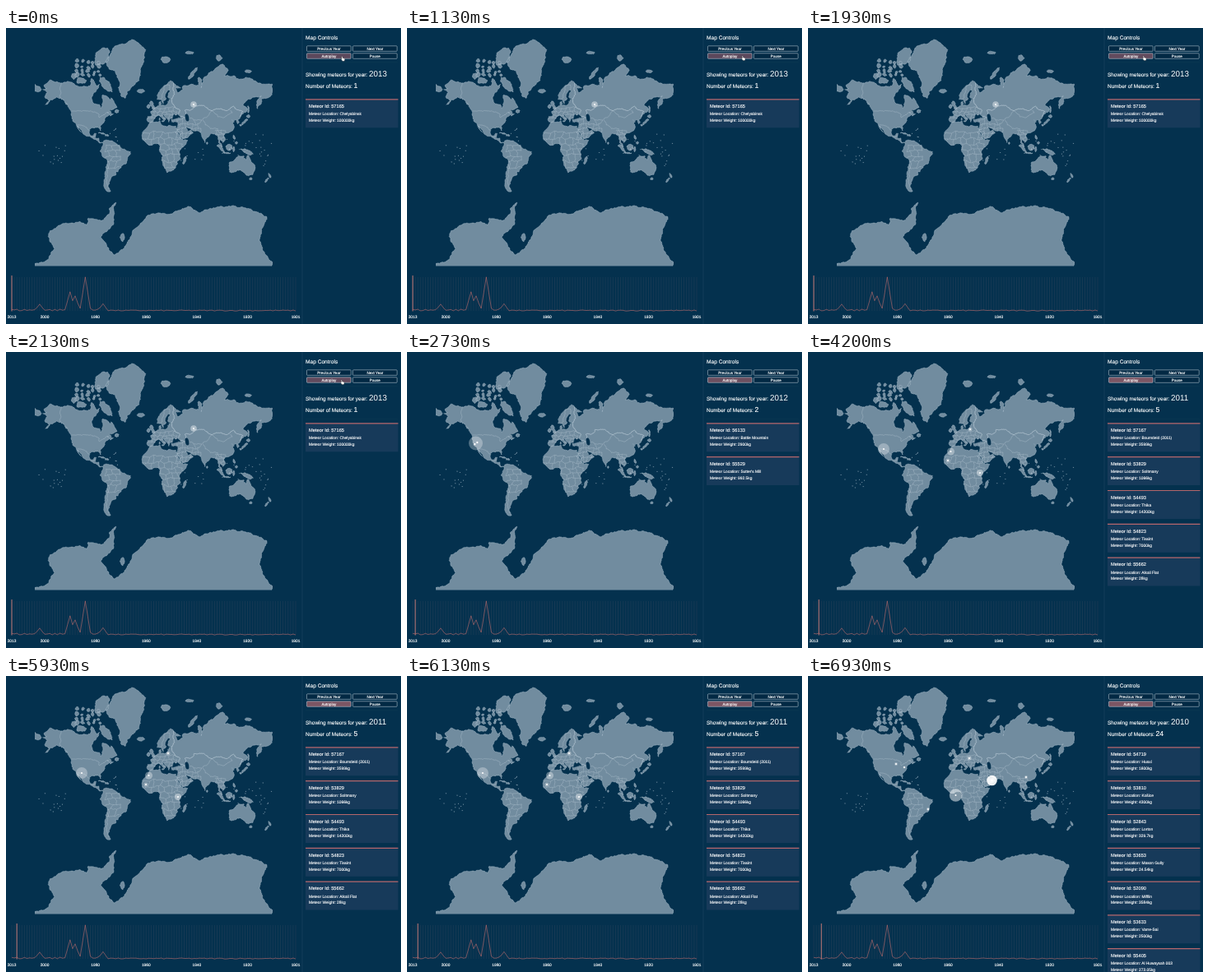
An HTML page for the animation above (8 s loop, 480x360 px).

```html
<!DOCTYPE html>
<html lang="en">
<head>
<meta charset="utf-8">
<title>Meteor map</title>
<style>
html, body { margin: 0; width: 100%; height: 100%; overflow: hidden; background: #04314e; }
svg { display: block; width: 100%; height: 100%; }
text { font-family: "Liberation Sans", Arial, sans-serif; fill: #fff; stroke: #fff; stroke-width: .13; text-rendering: geometricPrecision; }
.big { stroke: none; }
.mid { text-anchor: middle; }
#land { fill: #718c9f; stroke: #b0c3d0; stroke-width: .45; stroke-linejoin: round; }
#borders { fill: none; stroke: #b0c3d0; stroke-width: .4; }
</style>
</head>
<body>
<svg viewBox="0 0 480 360">
  <clipPath id="frame"><path d="M35 10H324V289.500H35Z"/></clipPath>
  <clipPath id="coast"><path id="coastline"/></clipPath>
  <g clip-path="url(#frame)">
    <path id="land"/>
    <path id="borders" clip-path="url(#coast)"/>
    <ellipse cx="220" cy="109" rx="2.200" ry="4.500" fill="#04314e" transform="rotate(-12 220 109)"/>
  </g>
  <g id="meteors"></g>
  <g id="chart"></g>
  <path d="M360 0V360" stroke="#1b4260" stroke-width=".7"/>
  <path d="M364 41.500H476M364 81.500H476" stroke="#0d3853" stroke-width=".5"/>
  <text x="364" y="14" font-size="6.600">Map Controls</text>
  <g id="buttons"></g>
  <g id="panel"></g>
  <path id="cursor" d="M0 0q.9-.6 1.100.500l.3 1.500 2 .5q.7.300.500 1.200l-.5 2h-2.400l-1.500-2.200q-.2-.9.700-.5Z" fill="#fff" stroke="#222" stroke-width=".35"/>
</svg>
<script>
const $ = id => document.getElementById(id);
const add = (id, markup) => $(id).insertAdjacentHTML('beforeend', markup);
let seed = 7;
const random = (a, b) => a + (b - a) * ((seed = seed * 16807 % 2147483647) / 2147483647);

// Mercator map
const project = ([lon, lat]) => [179.5 + lon * .803, 146 - 46 * Math.log(Math.tan(Math.PI / 4 + lat * Math.PI / 360))];
const parse = s => s.split(', ').map(p => project(p.split(' ').map(Number)));
// Jagged edge; gives the same line in both directions, so neighbours fit
const rough = (p, q) => {
  const len = Math.hypot(q[0] - p[0], q[1] - p[1]);
  if (len < 1.5) return [q];
  const w = Math.min(len * .15, .8), sx = p[0] + q[0], sy = p[1] + q[1];
  const m = [sx / 2 + w * Math.sin((sx + sy) * 7.3), sy / 2 + w * Math.cos((sx + sy) * 5.1)];
  return [...rough(p, m), ...rough(m, q)];
};
const trace = pts => 'M' + pts.flatMap((p, i) => i ? rough(pts[i - 1], p) : [p])
  .map(p => p.map(v => v.toFixed(2)).join(' ')).join('L');
let coast = '', lines = '';
const shape = pts => coast += trace([...pts, pts[0]]) + 'Z';
const land = s => shape(parse(s));
const border = s => lines += trace(parse(s));
const blob = (lon, lat, rx, ry, tilt = 0) => {
  const [x, y] = project([lon, lat]), c = Math.cos(tilt * Math.PI / 180), s = Math.sin(tilt * Math.PI / 180);
  shape(Array.from({ length: 8 }, (_, i) => {
    const a = i * Math.PI / 4, k = random(.75, 1.2), u = rx * k * Math.cos(a), v = ry * k * Math.sin(a);
    return [x + u * c - v * s, y + u * s + v * c];
  }));
};

// North America
land('-168 66, -162 66.5, -166 68.4, -156.5 71.3, -141 69.6, -128 70.3, -115 68, -96 68.2, -94 72, -86 68, -82 69, -87 65, -94 61, -92.5 57, -82.3 55, -80 51.2, -76.6 57, -77.5 62.4, -70 61, -66 58.8, -64.5 60.3, -56 52, -66 50.2, -70 47, -65 49, -64.5 46.3, -61 45.8, -65.5 43.5, -67 45, -74 40.6, -76 35.5, -81 31.5, -80.4 25.3, -84 30, -94 29.5, -97.3 27.5, -97.7 22.5, -95 18.3, -91 18.5, -90.3 21, -87 21.4, -88.8 15.8, -83.2 15, -82 9, -77.3 8.5, -83 8.3, -87.6 13, -95 16, -105.5 20, -109.3 26, -114.7 31.7, -109.5 23.2, -117 32.5, -122.4 37.5, -124.4 47, -130 54, -137 58.9, -147 60.8, -152 59.2, -164 54.7, -158 58.5, -165 61, -161 64');
border('-141 70, -141 60.3, -137 58.9, -130 55.3');
border('-124 49, -112 49, -104 49, -95 49, -89 48, -82.5 45.3, -82.5 42, -75 45, -69 47.4, -67 45');
border('-117 32.5, -106.5 31.8, -101.5 29.8, -97 26');
border('-92 14, -91 17.5, -88 18');
land('-73 78.3, -60 82, -32 83.5, -12 81.5, -20 75, -22 71, -32 68, -40 65, -43 60, -50 62, -53.5 67, -51 69.5, -58 75, -68 76');

// South America
land('-77.3 8.5, -71.7 12.4, -62 10.6, -51.5 4.2, -50 0, -35.2 -5.3, -39 -13, -41 -22, -48.6 -26, -54 -34, -58.3 -34, -57 -37.5, -62.2 -39, -65 -42, -67.4 -46, -69 -50.5, -65.2 -54.7, -71 -54.5, -75.5 -50, -73.6 -38, -70.3 -18.3, -76 -14, -81.3 -5, -77.5 3');
border('-68.4 -52.4, -71.5 -45, -70 -33, -67 -22.8, -70.4 -18.3');

// Europe and Asia meet along the borders of Russia
land('-9 37, -8.8 43.2, -1.8 43.4, -4.6 48.4, 4.5 52.5, 8.5 54, 8.2 57, 10.5 57.6, 10.5 54.3, 19 54.5, 21.5 57.6, 24 57.2, 23.5 59, 28 60, 28 56, 32 53, 40 49.6, 39 47.2, 33.5 44.5, 30.5 46.2, 28 42, 28.5 41.2, 23.8 40.2, 22.8 36.5, 19.4 41.5, 12.8 45.5, 18.4 40, 15.8 38, 12.3 41.7, 8.5 44.3, 3.2 43, -.3 39.5, -2 36.8, -5.5 36.1');
land('28 60, 22.8 60, 21.3 61.5, 25 65, 22 65.7, 17.3 62, 18.8 59.8, 14.3 55.5, 11 59, 5.3 59, 5 62, 14 67.5, 25.5 71, 30 69.7, 29 67, 31.5 62.8');
border('11 59, 12.3 62, 16.5 68, 24 68.5, 24 65.8');
land('30 69.7, 41 67, 33 66.7, 37 64, 44 66.2, 44 68, 60 69, 68 68.4, 68 72.5, 73 71, 72 67, 76 72.5, 87 75, 104 77.6, 113 75.5, 107 73.2, 123 73, 129 71.5, 140 72.5, 160 69.7, 180 69, 180 65, 179 62.5, 170 60, 163 59, 162 55, 157 51, 156 57, 163 61.5, 143 59.3, 135 54.7, 141 52, 140 48, 131 42.6, 135 48.4, 127 50, 121 53.3, 110 49.2, 98 51, 87 49.2, 76 54, 61 54, 59 50.7, 47 49.5, 48.5 41.8, 40 43.4, 37 45, 40 49.6, 32 53, 28 56, 28 60, 31.5 62.8, 29 67');
land('-180 69, -170 66, -174 64.5, -180 65');
land('48.5 41.8, 47 49.5, 59 50.7, 61 54, 76 54, 87 49.2, 98 51, 110 49.2, 121 53.3, 127 50, 135 48.4, 131 42.6, 127.5 39.5, 129.3 36, 126.5 34.5, 125 39.5, 118 39, 122 37, 119.5 35, 121.8 31, 119.5 25.5, 114 22.5, 108 21.5, 106 19, 109 13, 105 9, 101 13, 99.5 10, 104 1.5, 98.3 8, 97.3 16.7, 92 21, 87 21.5, 80 15, 77.5 8, 73 17, 72 21, 66.5 25.2, 57 26.5, 48 30, 51.5 24.5, 56.3 26, 59.7 22.5, 52 16, 43.5 12.8, 39 21.5, 35 29.5, 36 36.5, 27.5 36.8, 26.5 40, 41 41.5, 40 43.4');
border('87 49.2, 97 42.7, 105 41.6, 119 47, 116 49.5');
border('87 49.2, 80 42, 74 39.5, 78 33, 86 28, 97 28, 99 22, 108 21.5');

// Africa and Australia
land('-6 35.8, 10 37.3, 11 34, 20 30.8, 23 32.6, 34.3 31.2, 32.6 29.9, 37.3 21, 43.2 11.7, 51.2 11.8, 39 -4, 40.6 -15, 35 -20, 35.5 -24, 30.5 -31, 20 -34.8, 11.8 -18, 13.7 -11, 9 -1, 9.7 4, 4 6.4, -7.6 4.4, -16.7 12.5, -17 21.2, -9.8 30');
land('114 -22, 122 -18, 130 -12, 136.8 -12.2, 135.5 -15, 140 -17.7, 142.3 -10.8, 153.2 -25.5, 153 -31, 150 -37.3, 143.5 -38.7, 138 -35.5, 131.2 -31.5, 118 -35, 115 -34.2');

// Antarctica
land('-180 -84.6, -160 -84, -150 -82, -160 -79, -157 -77.2, -146 -75.7, -135 -74.5, -115 -74, -101 -75, -100 -72.5, -80 -73.3, -67 -70, -67 -67, -57 -63.3, -61 -67, -61 -75, -80 -79, -68 -82, -60 -83.2, -45 -82, -35 -79, -28 -76.5, -10 -71, 0 -70, 25 -70.2, 33 -68.7, 54 -66, 70 -69.5, 80 -67.8, 100 -66, 135 -66.2, 150 -68.5, 171 -71.5, 163 -77, 160 -80, 168 -83, 180 -84.4, 180 -86, -180 -86');

// Islands: longitude, latitude, radii, tilt
[[-2.5, 54.3, 2, 6, -18], [-8, 53.3, 1.8, 2.6], [-19, 65, 4.3, 2.4], [18, 79, 5, 4], [58, 73.8, 2.3, 9, 38],
 [54, 80.8, 5, 1.8], [99, 79.4, 3.5, 4], [143, 75, 4.500, 1.800], [-73, 69, 4.5, 11, -40], [-78, 80, 8, 13, 35],
 [-110, 71, 6, 4], [-121, 73, 3, 4], [-56, 48.8, 2.3, 2.3], [-47, -79.3, 3, 5]].forEach(b => blob(...b));
[[-79, 21.7, 4.5, .7, 15], [-71, 18.9, 2.2, 1], [46.7, -19, 1.7, 5.3, 20], [101.5, -.5, 7, 1.6, 48], [110, -7.3, 4, .7, 8],
 [114, .8, 3.8, 4.4, 20], [121, -2, 1.2, 3], [141, -5.2, 8, 2.3, 22], [121.5, 16, 1.2, 2.8, -15], [125, 8, 1.6, 1.6],
 [137.5, 36.5, 6, 1.2, -45], [143, 43.4, 2, 1.7], [131, 32.8, 1, 1.3], [142.8, 50.5, .9, 5], [80.8, 7.5, .8, 1.5],
 [146.7, -42, 1.6, 1.5], [175.8, -38.7, 1.2, 3, -25], [170.8, -43.7, 1.3, 4.2, 38], [14, 37.6, 1.2, .7], [9, 40, .6, 1.5]].forEach(b => blob(...b));
// Arctic archipelago and scattered specks
for (let lat = 73.3; lat < 80; lat += 1.7)
  for (let lon = -117; lon < -82; lon += 8.5)
    blob(lon + random(-2, 2), lat + random(-.4, .4), random(1.5, 3), random(1.2, 2.8), random(0, 90));
const specks = (n, x0, y0, x1, y1) => {
  while (n--) coast += `M${random(x0, x1)} ${random(y0, y1)}h.7l-.3.5Z`;
};
specks(16, 36, 142, 72, 166);
specks(20, 288, 128, 323, 168);
specks(12, 262, 132, 284, 156);
specks(8, 212, 146, 240, 164);
specks(8, 122, 122, 136, 137);

// Small countries: a wall of uneven bricks, cut at the coast
const bricks = (lon0, lat0, lon1, lat1, w, h) => {
  const row = lat => Array.from({ length: Math.round((lon1 - lon0) / w * 2) + 1 }, (_, i) =>
    project([lon0 + i * w / 2 + random(-.2, .2) * w, lat + random(-.25, .25) * h]));
  let last;
  for (let lat = lat0, k = 0; lat <= lat1; lat += h, k++) {
    const pts = row(lat);
    lines += trace(pts);
    if (last) pts.forEach((p, i) => { if (i % 2 == k % 2) lines += trace([last[i], p]); });
    last = pts;
  }
};
bricks(-18, -28, 42, 30, 10, 8.5);
bricks(-8, 41, 34, 54, 7, 3.6);
bricks(35, 16, 72, 44, 9, 6);
bricks(92, 10, 108, 25, 7, 5);
bricks(-74, -28, -50, 6, 11, 8);

$('land').setAttribute('d', coast);
$('coastline').setAttribute('d', coast);
$('borders').setAttribute('d', lines);

// Timeline: a low ripple with a few sharp peaks, given as index and height
const yearX = i => 7 + i * 345 / 112;
const peaks = [[11, 9], [23, 24], [25, 19], [29, 42], [36, 9.5]];
const count = i => Math.max(random(.6, i < 40 ? 3 : 1.8), ...peaks.map(([at, h]) => h * (1 - Math.abs(i - at) / 2.2)));
const years = Array.from({ length: 113 }, (_, i) => i);
add('chart', `<path d="${years.map(i => `M${yearX(i)} 303V344`).join('')}" stroke="#29435b" stroke-width=".5"/>
  <path id="now" stroke="#d9827c" stroke-width=".9"/>
  <path d="M${years.map(i => `${yearX(i)} ${344.8 - count(i)}`).join('L')}" fill="none" stroke="#c16d6d" stroke-width=".6"/>`);
for (const y of [2013, 2000, 1980, 1960, 1940, 1920, 1901])
  add('chart', `<text class="mid" x="${yearX(2013 - y)}" y="353" font-size="4.800">${y}</text>`);

['Previous Year', 'Next Year', 'Autoplay', 'Pause'].forEach((label, i) => {
  const x = 365.5 + i % 2 * 56, y = i < 2 ? 21.8 : 30.8;
  add('buttons', `<rect ${i == 2 ? 'id="auto"' : ''} x="${x}" y="${y}" width="53.700" height="6.500" rx=".8" fill="#022944" stroke="#c9d4dc" stroke-width=".5"/>
    <text class="mid" x="${x + 26.85}" y="${y + 4.9}" font-size="4.600">${label}</text>`);
});

// Meteors: card = id, place, weight; dot = x, y, halo radius, halo opacity, core radius
const scenes = [
  { total: 1, cards: ['57165|Chelyabinsk|100000'], dots: [[228, 93, 3.8, .42]] },
  { total: 2, cards: ['56133|Battle Mountain|2900', "55529|Sutter's Mill|992.5"],
    dots: [[83.5, 111, 8.5, .3, 0], [85.3, 110, 1.5, .3], [82.4, 112, 1.5, .3]] },
  { total: 5, cards: ['57167|Boumdeid (2011)|3599', '53829|Soltmany|1066', '54493|Thika|14200', '54823|Tissint|7000', '55662|Alkali Flat|28'],
    dots: [[92, 118, 7, .3], [197, 94, 2.5, .35], [170, 132, 2.5, .3], [173.5, 121, 4.5, .35], [209, 147, 4, .4]] },
  { total: 24, cards: ['54719|Huaxi|1600', '53810|Košice|4300', '52843|Lorton|329.7', '53653|Mason Gully|24.54', '52090|Mifflin|3584', '53633|Varre-Sai|2500', '55405|Al Huwaysah 003|273.05'],
    dots: [[223.5, 127, 6.3, .92], [179.5, 145, 7.7, .5], [107, 107, 2, .3], [117, 111, 1.5, .3], [146, 162, 2, .35], [196, 100, 2.5, .35], [265, 123, 2, .3]] }
];
const card = (s, i) => {
  const [id, place, weight] = s.split('|'), y = 86.3 + i * 40.8;
  const line = (dy, size, text) => `<text x="368" y="${y + dy}" font-size="${size}">${text}</text>`;
  return `<path d="M364 ${y}h112.500v35H364Z" fill="#173a5a"/><path d="M364 ${y + .6}h112.500" stroke="#b5666b" stroke-width="1.200"/>` +
    line(10.8, 5.7, `Meteor Id: ${id}`) + line(20.1, 4.85, `Meteor Location: ${place}`) + line(27.9, 4.85, `Meteor Weight: ${weight}kg`);
};
const showScene = n => {
  const { total, cards, dots } = scenes[n];
  $('panel').innerHTML = `<text x="364" y="58.500" font-size="6.450">Showing meteors for year:</text>
    <text class="big" x="441" y="59" font-size="9.900">${2013 - n}</text>
    <text x="364" y="72.500" font-size="6.450">Number of Meteors:</text>
    <text x="422.500" y="73" font-size="8.700">${total}</text>` + cards.map(card).join('');
  $('meteors').innerHTML = dots.map(([x, y, r, alpha, core = 1]) =>
    `<circle cx="${x}" cy="${y}" r="${r}" fill="#fff" opacity="${alpha}"/><circle cx="${x}" cy="${y}" r="${core}" fill="#fff"/>`).join('');
  $('now').setAttribute('d', `M${yearX(n)} 301V344.500`);
};

const ramp = (t, a, b) => Math.min(1, Math.max(0, (t - a) / (b - a)));
let shown = -1;
const draw = now => {
  const t = now % 8000;
  const n = [2190, 4190, 6190].filter(s => t >= s).length;
  if (n != shown) showScene(shown = n);
  const hover = ramp(t, 1860, 1930) * .2 + ramp(t, 2530, 3000) * .8;
  $('auto').setAttribute('fill', `rgb(${92 + 32 * hover},${72 + 14 * hover},${92 + 8 * hover})`);
  const first = t < 270, away = ramp(t, 2530, 2730);
  $('cursor').setAttribute('transform', `translate(${first ? 407.8 : 407.2} ${(first ? 34.6 : 33.9) - 45 * away * away})`);
  requestAnimationFrame(draw);
};
requestAnimationFrame(draw);
</script>
</body>
</html>
```
